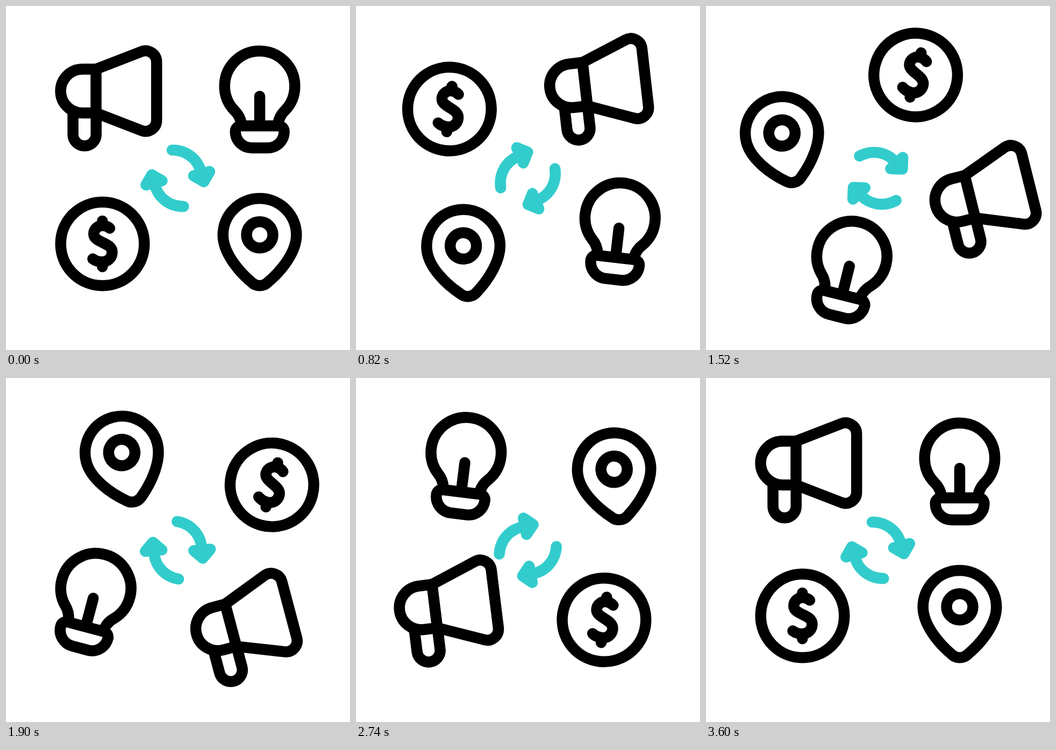
Write an HTML page that moves like this. It is 640 px wide and 640 px high and loops after 3.62 s.

```html
<!DOCTYPE html>
<html lang="en">
<head>
<meta charset="utf-8">
<title>Orbiting icons</title>
<style>
  html, body { margin: 0; width: 100%; height: 100%; overflow: hidden; background: #fff; }
  svg { display: block; width: 100vw; height: 100vh; }
  .line { fill: none; stroke: #000; stroke-width: 20.5; stroke-linejoin: round; }
  .round { stroke-linecap: round; }
  #arrows { fill: none; stroke: #33cccc; stroke-width: 20.5; stroke-linecap: round; stroke-linejoin: round; }
  .head { fill: #33cccc; }
</style>
</head>
<body>
<svg viewBox="0 0 640 640">
  <defs>
    <g id="arrow">
      <path d="M309 268C335 268 357 284 363 310"/>
      <path class="head" d="M349 316L379 308L368 327Z"/>
    </g>
  </defs>

  <g id="horn" class="line">
    <path d="M167.5 117.5H142.3A40.75 40.75 0 0 0 142.3 199H167.5Z"/>
    <path d="M167.5 117.5L252.1 84.8A20.7 20.7 0 0 1 280.2 104V212.5A20.7 20.7 0 0 1 252.1 231.8L167.5 199"/>
    <path d="M124.6 195V238.7A21.55 21.55 0 0 0 167.7 238.7V199"/>
  </g>

  <g id="bulb" class="line">
    <path d="M438 219C436 208 432 201 425 194.4A65.3 65.3 0 1 1 519 194.4C512 201 508 208 506 219"/>
    <path d="M437 223H507A10.3 10.3 0 0 1 517.5 233.5A30.3 30.3 0 0 1 487.5 264H457A30.3 30.3 0 0 1 426.8 233.5A10.3 10.3 0 0 1 437 223Z"/>
    <path class="round" d="M472 168V220"/>
  </g>

  <g id="pin" class="line">
    <path d="M403.7 426A68.3 68 0 0 1 540.3 426C540.3 459 511 494 486.5 514.5A21 21 0 0 1 457.5 514.5C433 494 403.7 459 403.7 426Z"/>
    <circle cx="472" cy="425.7" r="24.5"/>
  </g>

  <g id="coin" class="line">
    <circle cx="179.5" cy="442.5" r="77.8"/>
    <path class="round" d="M193 413.5C188 409 183 408.5 179.3 408.5C171 408.5 163.3 415 163.3 424C163.3 441 197.5 439 197.5 458C197.5 469 189 476 179.3 476C172 476 166 474 161.5 470.5M179.3 400V408M179.3 476V485"/>
  </g>

  <g id="arrows">
    <use href="#arrow"/>
    <use href="#arrow" transform="rotate(180 319.7 320.5)"/>
  </g>
</svg>
<script>
const TURN = 3600, LOOP = 3620, TILT = 15;

// Corners, clockwise from top left.
const stops = [[191, 172], [472, 174], [472, 439.5], [179.5, 442.5]];

// Per side: outward direction, handle reach along the side, outward bulge.
const sides = [
  { out: [0, -1], reach: [.28, .265], bulge: [68, 71] },
  { out: [1, 0], reach: [.258, .27], bulge: [78, 67] },
  { out: [0, 1], reach: [.26, .26], bulge: [82, 72] },
  { out: [-1, 0], reach: [.28, .255], bulge: [67, 67] }
];

// dir: way of tilting; tall: height of the icon's loop.
const icons = [
  { id: 'horn', dir: -1, tall: 1.012 },
  { id: 'bulb', dir: 1, tall: 1 },
  { id: 'pin', dir: -1, tall: 1 },
  { id: 'coin', dir: 1, tall: 1 }
].map((icon, i) => ({ ...icon, start: i, el: document.getElementById(icon.id) }));

const arrows = document.getElementById('arrows');

function pathPoint(pos) {
  const n = Math.floor(pos) % 4;
  const p = pos % 1, q = 1 - p;
  const a = stops[n], b = stops[(n + 1) % 4];
  const { out, reach, bulge } = sides[n];
  const w1 = 3 * p * q * q, w2 = 3 * p * p * q;
  const along = w1 * reach[0] + w2 * (1 - reach[1]) + p * p * p;
  const push = w1 * bulge[0] + w2 * bulge[1];
  return [0, 1].map(k => a[k] + (b[k] - a[k]) * along + out[k] * push);
}

function draw(now) {
  const turn = Math.min(now % LOOP, TURN) / TURN;
  const swing = 1 - Math.abs(1 - 2 * turn);
  const tilt = TILT * swing * swing * (3 - 2 * swing);

  for (const { el, start, dir, tall } of icons) {
    const [x, y] = pathPoint(start + turn * 4);
    const [cx, cy] = stops[start];
    el.setAttribute('transform',
      `translate(${x} ${cy + (y - cy) * tall}) rotate(${dir * tilt}) translate(${-cx} ${-cy})`);
  }
  arrows.setAttribute('transform', `rotate(${turn * 360} 319.7 320.5)`);
}

let begin;
function tick(now) {
  begin ??= now;
  draw(now - begin);
  requestAnimationFrame(tick);
}
draw(0);
requestAnimationFrame(tick);
</script>
</body>
</html>
```
